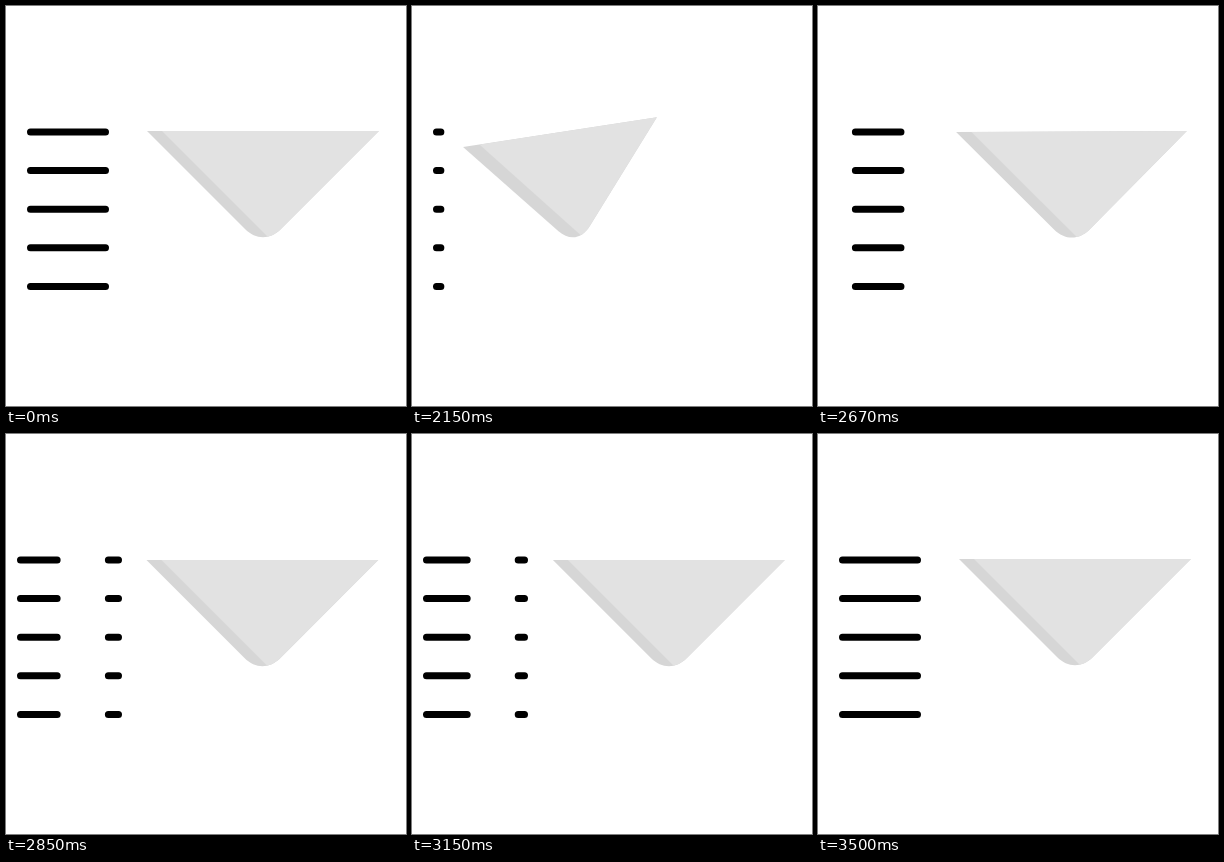
Recreate the animation shown at these times as an HTML page with a canvas. Size 400x400 px, loop 3520 ms.

```html
<!DOCTYPE html>
<html>
<head>
<meta charset="utf-8">
<style>
  html, body { margin: 0; width: 100%; height: 100%; overflow: hidden; background: #fff; }
  canvas { display: block; width: 400px; height: 400px; }
</style>
</head>
<body>
<canvas id="stage" width="400" height="400"></canvas>
<script>
const ctx = document.getElementById('stage').getContext('2d');

const LOOP = 3520, REST = 2020, STEP = 25;
const BACK = 475;                      // flap springs back
const SPIN_START = 495, SPIN = 750;    // dashes circulate
const SETTLE = 1245, END = 1500;       // dashes return to rest

const TRACK = { from: 14.5, to: 112.5 };
const TRACK_LENGTH = TRACK.to - TRACK.from;
const RESTING = [24.5, 99.5], EMPTY = [24.5, 24.5], FLYING = [14.5, 61.5];

// Flap points: [at rest, fully pulled left]
const FLAP = {
  left:   [[141, 125], [45.5, 142]],
  right:  [[373, 125], [237, 110.5]],
  curveA: [[239, 223], [140.5, 225]],
  curveB: [[275, 223], [172, 219.5]],
  foldA:  [[156, 125], [62, 139.3]],
  foldB:  [[262, 231], [163, 229]]
};

const clamp = x => Math.min(1, Math.max(0, x));
const ramp = (t, a, b) => clamp((t - a) / (b - a));
const mix = (a, b, k) => a.map((v, i) => v + (b[i] - v) * k);
const snap = t => t <= 0 ? 0 : 1 - Math.pow(1 + t / 170, -4.5);
const easeInOut = x => x < 0.5 ? 2 * x * x : 1 - 2 * (1 - x) ** 2;

// Extends the line from a to b by the given distance past b.
function beyond(a, b, distance) {
  return mix(a, b, 1 + distance / Math.hypot(b[0] - a[0], b[1] - a[1]));
}

function drawFlap(pull, drop) {
  const p = {};
  for (const name in FLAP) p[name] = mix(...FLAP[name], pull);
  const controlA = beyond(p.left, p.curveA, 15.5);
  const controlB = beyond(p.right, p.curveB, 15.5);

  ctx.save();
  ctx.translate(0, drop);
  ctx.beginPath();
  ctx.moveTo(...p.left);
  ctx.lineTo(...p.right);
  ctx.lineTo(...p.curveB);
  ctx.bezierCurveTo(...controlB, ...controlA, ...p.curveA);
  ctx.closePath();
  ctx.fillStyle = '#d6d6d6';
  ctx.fill();
  ctx.clip();

  ctx.beginPath();
  ctx.moveTo(...p.foldA);
  ctx.lineTo(p.right[0] + 2, p.right[1] - 2);
  ctx.lineTo(p.right[0] + 2, 260);
  ctx.lineTo(...beyond(p.foldA, p.foldB, 30));
  ctx.fillStyle = '#e2e2e2';
  ctx.fill();
  ctx.restore();
}

function drawSegment(from, to) {
  const a = Math.max(from, TRACK.from), b = Math.min(to, TRACK.to);
  if (b - a < 0.8) return;
  ctx.beginPath();
  for (let i = 0; i < 5; i++) {
    const y = 126 + i * 38.6;
    ctx.moveTo(a, y);
    ctx.lineTo(b, y);
  }
  ctx.stroke();
}

function drawLines([from, to], offset) {
  ctx.strokeStyle = '#000';
  ctx.lineWidth = 7;
  ctx.lineCap = 'round';
  const shift = offset % TRACK_LENGTH;
  drawSegment(from + shift, to + shift);
  drawSegment(from + shift - TRACK_LENGTH, to + shift - TRACK_LENGTH);
}

// Time since the motion began, held on alternating 30 and 20 ms steps.
function motionTime(t) {
  if (t < REST) return 0;
  const d = t - REST;
  const step = Math.floor(d / 50) * 2 + (d % 50 >= 30 ? 1 : 0);
  return (step + 1) * STEP;
}

function lineSpan(u) {
  if (u === 0 || u >= END) return RESTING;
  if (u < BACK) return mix(RESTING, EMPTY, snap(u));
  if (u < SETTLE) return mix(EMPTY, FLYING, snap(u - BACK));
  return mix(FLYING, RESTING, snap(u - SETTLE));
}

function draw(t) {
  const u = motionTime(t);
  const pull = u >= END ? 0 : u < BACK ? snap(u) : 1 - snap(u - BACK);
  const drop = ramp(u, 600, 800) - ramp(u, SETTLE, END);
  const spin = easeInOut(ramp(u, SPIN_START, SPIN_START + SPIN)) * 2 * TRACK_LENGTH;

  ctx.fillStyle = '#fff';
  ctx.fillRect(0, 0, 400, 400);
  drawFlap(pull, drop);
  drawLines(lineSpan(u), spin);
}

const start = performance.now();
function tick() {
  draw((performance.now() - start) % LOOP);
  requestAnimationFrame(tick);
}
tick();
</script>
</body>
</html>
```
